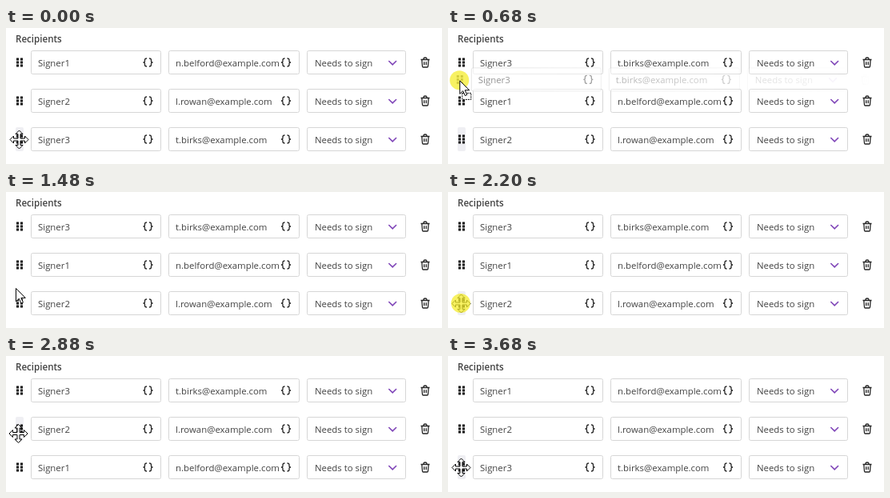
Write an HTML page that moves like this. It is 545x170 px and loops after 3.72 s.

```html
<!DOCTYPE html>
<html lang="en">
<head>
<meta charset="utf-8">
<title>Reorder recipients</title>
<style>
  html, body { margin: 0; width: 100%; height: 100%; overflow: hidden; background: #fff; }
  svg { display: block; width: 545px; height: 170px; }
  text { font: 11.4px "Open Sans", "Noto Sans", sans-serif; fill: #424242; }
  .title { font-size: 11.6px; font-weight: 600; }
  .field { fill: #fff; stroke: #d6d6d6; }
  .line { fill: none; stroke: #242424; stroke-width: 1.3; }
  .grip { fill: none; stroke: #111; stroke-width: 3; stroke-dasharray: 3 1; }
  .chevron { fill: none; stroke: #7f45b8; stroke-width: 1.6; stroke-linecap: round; }
  .pointer { fill: #fff; stroke: #000; }
  #spot { fill: #f4ec2e; opacity: .75; }
</style>
</head>
<body>
<svg viewBox="0 0 545 170">
  <defs>
    <linearGradient id="fade" gradientUnits="userSpaceOnUse" x1="20" x2="530">
      <stop stop-color="#fff" stop-opacity=".62"/>
      <stop offset="1" stop-color="#fff" stop-opacity="0"/>
    </linearGradient>
    <mask id="fadeMask" maskUnits="userSpaceOnUse" x="0" y="-20" width="545" height="40">
      <rect y="-20" width="545" height="40" fill="url(#fade)"/>
    </mask>
    <path id="brace" class="line" d="M5-5q-2.500 0-2.500 2v1.500q0 1.500-2 1.500q2 0 2 1.500v1.500q0 2 2.500 2"/>
    <g id="braces">
      <use href="#brace"/>
      <use href="#brace" transform="translate(13) scale(-1 1)"/>
    </g>
    <g id="frame">
      <rect class="field" x="31.5" y="-14.5" width="162" height="29" rx="2"/>
      <rect class="field" x="203.5" y="-14.5" width="163" height="29" rx="2"/>
      <rect class="field" x="376.5" y="-14.5" width="123" height="29" rx="2"/>
      <path class="grip" d="M14.500-5.500v11M19.500-5.500v11"/>
      <use href="#braces" x="171"/>
      <use href="#braces" x="343.500"/>
      <path class="chevron" d="M478.800-1.500l4.400 4.400l4.400-4.400"/>
      <path class="line" d="M518.500-3.500h11M522-3.500v-1q0-1.500 2-1.500t2 1.500v1M519.800-3.500l.7 8.500q.1 1 1 1h5q.9 0 1-1l.7-8.500M522.700-.8v4M525.300-.8v4"/>
    </g>
  </defs>

  <text class="title" x="12" y="18">Recipients</text>
  <rect id="hover" x="12" width="10" height="30" rx="2" fill="#efeff3"/>
  <g id="rows"></g>
  <g id="ghost" mask="url(#fadeMask)"><use/></g>
  <path id="move" class="pointer" d="M0-11.500l4.500 4.500h-3v5.500h5.500v-3l4.500 4.500l-4.500 4.500v-3h-5.500v5.500h3l-4.500 4.500l-4.500-4.500h3v-5.500h-5.500v3l-4.500-4.500l4.500-4.500v3h5.500v-5.500h-3z"/>
  <circle id="spot" r="12"/>
  <g id="arrow" class="pointer">
    <rect id="badge" x="3" y="15.500" width="11" height="8" stroke-dasharray="2 1"/>
    <path d="M0 0v16.500l3.900-3.700l2.600 5.900l2.500-1.100l-2.600-5.700h5.400z"/>
  </g>
</svg>
<script>
const LOOP = 3720, STEP = 40, RESET = 3680;
const rowY = slot => 43 + 48 * slot;
const emails = ["n.belford@example.com", "l.rowan@example.com", "t.birks@example.com"];
const $ = id => document.getElementById(id);

const linear = s => s;
const easeIn = s => s ** 1.8;
const lateTurn = s => s ** 4;
const easeOut = s => 1 - (1 - s) ** 1.9;

// The pointer rests between moves
const moves = [
  { start: 320, end: 960, from: [17.8, 134], to: [12.5, 48], easeX: linear, easeY: easeOut },
  { start: 1120, end: 1760, from: [12, 48], to: [16.5, 139.5], easeX: lateTurn, easeY: easeOut },
  { start: 2320, end: 2680, from: [16.5, 130], to: [15.5, 97], easeX: linear, easeY: easeOut },
  { start: 3040, end: RESET, from: [15.5, 97], to: [16.5, 139.5], easeX: linear, easeY: easeIn }
];
const drags = [
  { row: 2, press: 160, start: 320, drop: 1160 },
  { row: 1, press: 2200, start: 2320, drop: 2840 }
];

$("rows").innerHTML = emails.map((email, i) => `<g><g id="row${i}">
  <use href="#frame"/>
  <text x="40" y="4.5">Signer${i + 1}</text>
  <text x="212" y="4.5">${email}</text>
  <text x="386" y="4.5">Needs to sign</text></g></g>`).join("");
const rows = [...$("rows").children];
const ghostRow = $("ghost").firstElementChild;

const place = (el, x, y) => el.setAttribute("transform", `translate(${x} ${y})`);
const show = (el, on) => el.style.display = on ? "" : "none";
const nearestSlot = y => Math.max(0, Math.min(2, Math.round((y - 43) / 48)));

function pointerAt(t) {
  const last = moves[moves.length - 1];
  const { start, end, from, to, easeX, easeY } = moves.filter(m => t >= m.start).pop() || last;
  const s = t < start ? 1 : Math.min(1, (t - start) / (end - start));
  const mix = (axis, ease) => from[axis] + (to[axis] - from[axis]) * ease(s);
  return [mix(0, easeX), mix(1, easeY)];
}

// Each dragged row takes the slot nearest to the pointer
function orderAt(t) {
  const order = [0, 1, 2];
  if (t >= RESET) return order;
  for (const { row, start, drop } of drags) {
    if (t < start) break;
    const [, y] = pointerAt(Math.min(t, drop - STEP));
    order.splice(order.indexOf(row), 1);
    order.splice(nearestSlot(y), 0, row);
  }
  return order;
}

function render(t) {
  const [x, y] = pointerAt(t);
  const pressed = drags.find(d => t >= d.press && t < d.drop);
  const dragging = !!pressed && t >= pressed.start;
  const slot = nearestSlot(y);
  const onGrip = !dragging && x > 13 && Math.abs(y - rowY(slot)) <= 15;

  orderAt(t).forEach((row, i) => place(rows[row], 0, rowY(i)));

  show($("hover"), dragging || onGrip);
  $("hover").setAttribute("y", rowY(dragging ? 2 : slot) - 15);

  show($("ghost"), dragging);
  if (dragging) {
    ghostRow.setAttribute("href", "#row" + pressed.row);
    place($("ghost"), x - 17, y - 1.5);
  }

  show($("spot"), pressed);
  place($("spot"), x - 0.6, y - 0.6);
  show($("move"), onGrip);
  place($("move"), x, y);
  show($("arrow"), !onGrip);
  show($("badge"), dragging);
  place($("arrow"), x, y);
}

const start = performance.now();
function tick() {
  const t = (performance.now() - start) % LOOP;
  render(Math.floor(t / STEP) * STEP);
  requestAnimationFrame(tick);
}
tick();
</script>
</body>
</html>
```
